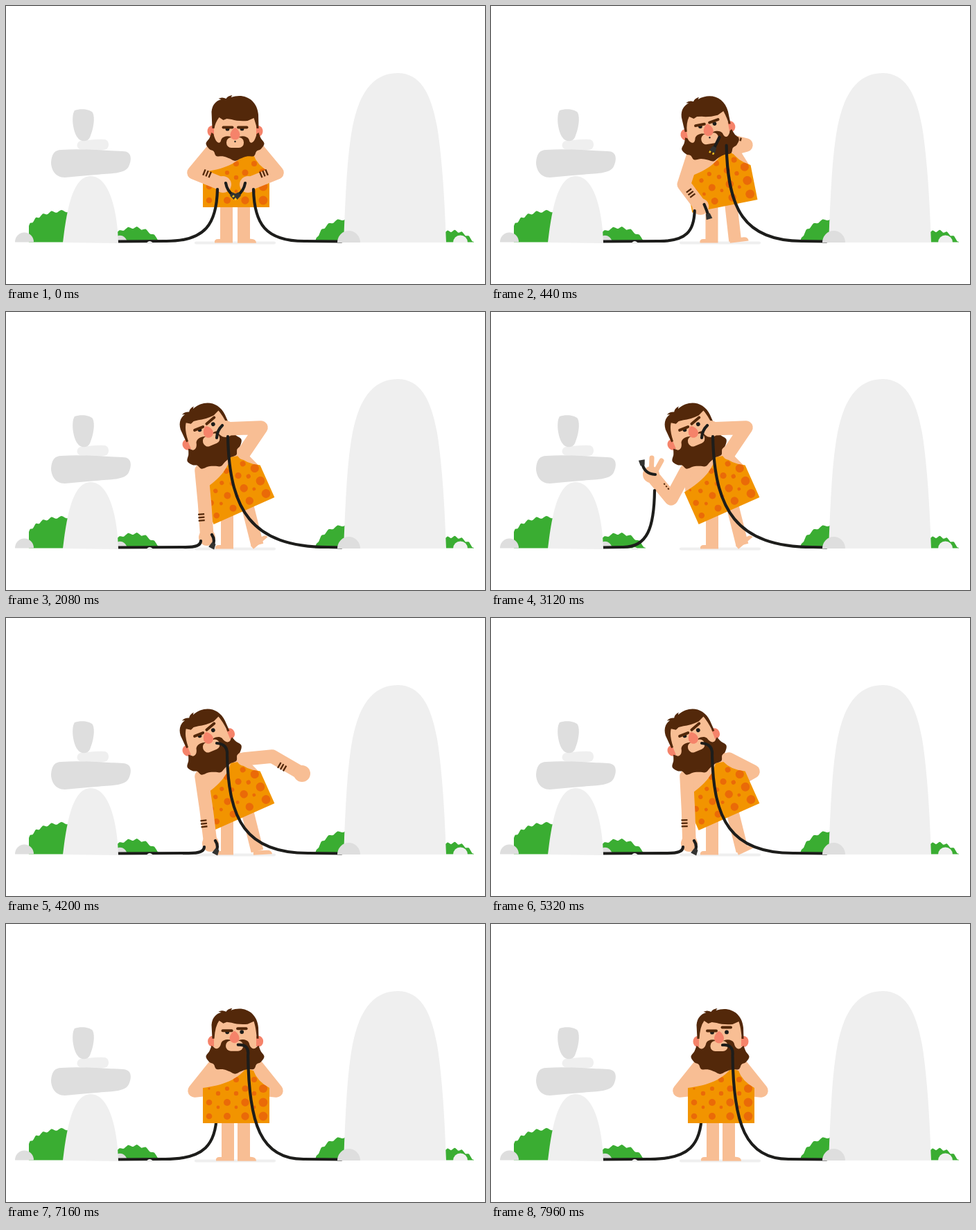
An HTML page for the animation above (8000 ms loop, 691 px wide and 402 px high).

```html
<!DOCTYPE html>
<html lang="en">
<head>
<meta charset="utf-8">
<title>Caveman and cable</title>
<style>
html, body { margin: 0; width: 100%; height: 100%; overflow: hidden; background: #fff; }
svg { display: block; width: 100%; height: 100%; }
.skin { fill: #f8be94; }
.limb { fill: none; stroke: #f8be94; stroke-linejoin: round; stroke-linecap: round; }
.hair { fill: #53280a; }
.band { fill: none; stroke: #53280a; stroke-width: 2.3; }
.brow { stroke: #53280a; stroke-width: 4; stroke-linecap: round; }
.wire { fill: none; stroke: #1d1d1b; stroke-width: 4.2; stroke-linecap: round; stroke-linejoin: round; }
.pink { fill: #f5836a; }
.bush { fill: #3aad32; }
.pale { fill: #efefef; }
.grey { fill: #dedede; }
</style>
</head>
<body>
<svg viewBox="0 0 691 402">
  <g id="bushes" class="bush"></g>
  <path class="grey" d="M155 342C156 329 171 328 175 341Z"/>
  <rect class="pale" x="272" y="340.5" width="117" height="4" rx="2"/>

  <g id="back"></g>
  <path id="legL" class="skin"/>
  <path id="legR" class="limb" style="stroke-width:18;stroke-linecap:butt"/>
  <path id="foot" class="skin" d="M0 0V-6H19Q27 -6 27 0Z"/>
  <g id="body">
    <clipPath id="cut"><path id="dress" d="M284 237C315 233 333 225 346 209L357 212Q362 227 380 237V288H284Z"/></clipPath>
    <path class="skin" d="M298 200L331 190L364 200L380 242H284Z"/>
    <use href="#dress" fill="#f29400"/>
    <g id="spots" fill="#ea6a08" clip-path="url(#cut)"></g>
  </g>
  <g id="mid"></g>
  <g id="head">
    <ellipse id="earL" class="pink" rx="7" ry="8"/>
    <ellipse id="earR" class="pink" rx="7" ry="8"/>
    <rect class="skin" x="-30.500" y="-36" width="61" height="64" rx="12"/>
    <path id="hair" class="hair"/>
    <path id="beard" class="hair"/>
    <g id="face">
      <rect class="skin" x="-12.500" y="-1" width="25" height="15" rx="7"/>
      <circle id="lips" cx="0" cy="5" r="1.2" fill="#1d1d1b"/>
      <g id="tongue">
        <path d="M-14 4Q-11 -2 -4 1L-7 4Z" fill="#53280a"/>
        <ellipse cx="-10" cy="3" rx="4" ry="2.4" fill="#e30613"/>
      </g>
      <g id="eyes" fill="#1d1d1b">
        <circle cx="-11" cy="-13.300" r="2.9"/>
        <circle cx="10" cy="-13.600" r="2.9"/>
      </g>
      <path class="brow" d="M-17 -15.500H-4"/>
      <path id="brow" class="brow"/>
      <path class="pink" d="M0 -15C3 -14 7 -9 7 -4.500A7 7 0 0 1 -7 -4.500C-7 -9 -3 -14 0 -15Z"/>
    </g>
  </g>
  <g id="front"></g>
  <g id="wires"></g>

  <path class="pale" d="M202 344Q207 336 213 344Z"/>
  <path class="pale" d="M82 342C87 300 95 246 122 246C150 246 161 300 162 343Z"/>
  <path class="pale" d="M108 195C120 194 132 192 142 193C150 194 149 205 145 207C135 210 115 208 107 207C101 206 101 196 108 195Z"/>
  <path class="grey" d="M99 151C108 148 120 149 125 154C129 162 126 178 121 190C118 197 107 197 103 190C96 180 94 158 99 151Z"/>
  <path class="grey" d="M80 208C110 206 140 209 168 210C183 210 181 224 177 232C172 243 150 242 130 244C112 245 100 247 85 248C70 248 65 235 65 226C66 214 70 208 80 208Z"/>
  <path class="grey" d="M13 341.500A13.500 14 0 0 1 40 341.500Z"/>
  <path class="pale" d="M487 342C489 300 491 210 502 165C513 118 535 97 565 97C597 97 613 125 622 175C630 225 633 290 635 342Z"/>
  <path class="grey" d="M478 342A16.500 17 0 0 1 511 342Z"/>
  <path class="pale" d="M645 342A10.500 10.500 0 0 1 666 342Z"/>
</svg>
<script>
const LOOP = 8000, GROUND = 340.5, AXIS = 331;
const $ = id => document.getElementById(id);
const set = (el, attrs) => { for (const k in attrs) el.setAttribute(k, attrs[k]); };
const add = (parent, tag, attrs) => {
  const el = document.createElementNS('http://www.w3.org/2000/svg', tag);
  set(el, attrs);
  return parent.appendChild(el);
};
const show = (el, on) => set(el, { visibility: on ? 'visible' : 'hidden' });
const mix = (a, b, u) => a + (b - a) * u;
const blend = (a, b, u) => Array.isArray(a) ? a.map((v, i) => mix(v, b[i], u)) : mix(a, b, u);
const ease = u => u < .5 ? 4 * u ** 3 : 1 - (2 - 2 * u) ** 3 / 2;
// Eased progress from 0 to 1 between two times
const ramp = (t, a, b) => ease(Math.min(1, Math.max(0, (t - a) / (b - a))));

// Moves through a start pose and [from, to, pose] steps
const play = (t, start, ...steps) =>
  steps.reduce((pose, [a, b, next]) => blend(pose, next, ramp(t, a, b)), start);

// Smooth curve through [x, y] points
function curve(p) {
  let d = `M${p[0]}`;
  for (let i = 0; i < p.length - 1; i++) {
    const a = p[i - 1] || p[i], b = p[i], c = p[i + 1], e = p[i + 2] || c;
    d += `C${b[0] + (c[0] - a[0]) / 6} ${b[1] + (c[1] - a[1]) / 6} ${c[0] - (e[0] - b[0]) / 6} ${c[1] - (e[1] - b[1]) / 6} ${c}`;
  }
  return d;
}

// Leafy edge: a rippled arc from (x0, y0) to (x1, y1), bent towards (cx, cy)
function bush(x0, y0, cx, cy, x1, y1, leaves) {
  const points = [], n = leaves * 4;
  for (let i = 0; i <= n; i++) {
    const u = i / n, v = 1 - u;
    points.push([
      v * v * x0 + 2 * u * v * cx + u * u * x1,
      v * v * y0 + 2 * u * v * cy + u * u * y1 - 1.6 * Math.sin(u * leaves * 2 * Math.PI)
    ]);
  }
  add($('bushes'), 'path', { d: `${curve(points)}V341.5H${x0}Z` });
}
bush(33, 318, 50, 294, 92, 297, 5);
bush(160, 328, 193, 308, 223, 341, 5);
bush(446, 341, 457, 311, 490, 308, 4);
bush(634, 327, 656, 320, 675, 341, 4);

// Big spots on a grid, small ones between them
for (let row = 0; row < 3; row++) {
  for (let col = 0; col < 4; col++) {
    const x = 293 + 26 * col, y = 278 - 20 * row;
    add($('spots'), 'circle', { cx: x, cy: y, r: row < 2 ? 4.3 + .7 * col : 1.6 + 1.5 * col });
    add($('spots'), 'circle', { cx: x + 13, cy: y - 13, r: 2.4 + row * .8 });
  }
}

function makeArm() {
  const g = add($('mid'), 'g', {});
  return {
    g,
    limb: add(g, 'path', { class: 'limb', 'stroke-width': 19.5 }),
    hand: add(g, 'circle', { class: 'skin', r: 12 }),
    bands: add(g, 'path', { class: 'band' })
  };
}

function makeWire() {
  const g = add($('wires'), 'g', {});
  const wire = { g, line: add(g, 'path', { class: 'wire' }), plug: add(g, 'g', {}) };
  wire.prongs = add(wire.plug, 'path', { d: 'M3 -2.700H7M3 2.700H7', stroke: '#f6c521', 'stroke-width': 2.4 });
  add(wire.plug, 'path', { d: 'M-4 -3L4 -4.500V4.500L-4 3Z', fill: '#333331' });
  return wire;
}

const armL = makeArm(), armR = makeArm();
const wireL = makeWire(), wireR = makeWire();
const fingers = add(armL.g, 'path', { class: 'limb', 'stroke-width': 7 });
wireL.prongs.remove();

// Arm pose: elbow, hand, band length
const flipArm = ([ex, ey, hx, hy, band]) => [2 * AXIS - ex, ey, 2 * AXIS - hx, hy, band];
const floorArm = x => [(283 + x) / 2, 277, x, 326, 9];
const hold = [271, 241, 313, 258, 9], behind = [272, 241, 300, 238, 0];
const wave = [260, 270, 231, 235, 2];
const high = [342, 156, 317, 119, 0], bite = [368, 167, 317, 169, 0];
const fling = [392, 164, 449, 126, 9], out = [384, 200, 427, 225, 9], hip = [378, 222, 350, 238, 0];

// Wire pose: grip, where it meets the ground, plug, end of the plug piece, its bend
const flipWire = ([gx, gy, reach, px, py, ex, ey, bend]) =>
  [2 * AXIS - gx, gy, 2 * AXIS - reach, 2 * AXIS - px, py, 2 * AXIS - ex, ey, -bend];
const floorWire = x => [x - 9, 331, x - 35, x + 8, 338, x + 7, 322, .3];
const holdWire = [305, 265, 230, 328, 274, 317, 256, -.2];
const behindWire = [304, 275, 228, 320, 262, 314, 260, 0];
const waveWire = [236, 258, 190, 218, 218, 237, 235, .4];
const highWire = [320, 130, 470, 306, 132, 312, 115, -.2];
const biteWire = [320, 180, 465, 304, 182, 312, 164, -.2];
const leanWire = [319, 198, 437, 304, 181, 319, 198, -.5];
const frontWire = [350, 190, 430, 336, 174, 350, 190, -.6];
const turnWire = [348.5, 190, 430, 334, 175, 348.5, 190, -.6];

function place(el, layer) {
  if (el.parentNode !== $(layer)) $(layer).appendChild(el);
}

function drawArm(arm, [sx, sy], [ex, ey, hx, hy, band], side) {
  set(arm.limb, { d: `M${sx} ${sy}L${ex} ${ey}L${hx} ${hy}` });
  set(arm.hand, { cx: hx, cy: hy });
  const n = Math.hypot(hx - ex, hy - ey) || 1, ux = (hx - ex) / n, uy = (hy - ey) / n;
  const spot = (s, o) => `${ex + ux * s + uy * o} ${ey + uy * s - ux * o}`;
  const d = [-4.5, 0, 4.5].map(s =>
    `M${spot(n * .4 + s, side - band / 2)}L${spot(n * .4 + s, side + band / 2)}`).join('');
  set(arm.bands, { d });
  show(arm.bands, band > .5);
}

function drawWire(wire, [gx, gy, reach, px, py, ex, ey, bend], anchor) {
  const span = reach - gx, drop = GROUND - gy;
  const taut = Math.min(1, Math.max(0, (drop - 160) / 50));
  const cx = (px + ex) / 2 - bend * (ey - py), cy = (py + ey) / 2 + bend * (ex - px);
  set(wire.line, { d: `M${gx} ${gy}C${gx + span * mix(.015, .06, taut)} ${gy + drop * mix(.65, .46, taut)}
    ${gx + span * mix(.22, .35, taut)} ${GROUND - 10 * taut} ${reach} ${GROUND - .5}L${anchor} ${GROUND}
    M${px} ${py}Q${cx} ${cy} ${ex} ${ey}` });
  const angle = Math.atan2(py - cy, px - cx) * 180 / Math.PI;
  set(wire.plug, { transform: `translate(${px} ${py}) rotate(${angle})` });
}

function drawHead(lean, dip, bob, turn) {
  const d = 14 * dip, ear = 4 * dip, tip = ear - 4;
  set($('head'), { transform: `translate(${mix(330.5, 292.3, lean)} ${mix(170, 179.5, lean) + 7 * dip + bob}) rotate(${-22 * lean})` });
  set($('earL'), { cx: -33 + turn, cy: ear });
  set($('earR'), { cx: 33 + turn, cy: ear });
  set($('hair'), { d: `M-33 ${tip}L-34 -24C-33 -35 -27 -40 -20 -42L-24 -43Q-19 -46 -13 -43Q-11 -47 -4 -48L-6 -45
    C14 -52 32 -41 33.500 -20L34 ${tip}H31C31 ${-10 + d / 2} 30 ${-20 + d} 27 ${-29 + d}L18 ${-25 + d}Q4 ${-24 + d} -5 ${-27 + d}
    L-12 ${-28 + d}L-17 ${-26 + d}L-23 ${-30 + d}Q-29 ${-22 + d} -30 ${tip}Z` });
  const half = [[34, 6], [37, 14], [42, 22], [37, 30], [31, 33], [27, 40], [17, 40.5], [8, 43.5]];
  const edge = [...half.map(([x, y]) => [-x, y]), [0, 47], ...half.reverse()];
  set($('beard'), { d: `${curve(edge)}L31 8C29 ${12 + d / 2} 22 ${12 + d} 20 ${2 + d}C17 ${-4 + d} 6 ${-4 + d} 2 ${1 + d}
    H-2C-6 ${-4 + d} -17 ${-4 + d} -20 ${2 + d}C-22 ${12 + d} -29 ${12 + d / 2} -31 8Z` });
  set($('face'), { transform: `translate(${1.5 * (lean - turn)} ${d})` });
  set($('eyes'), { transform: `translate(${lean + turn} 0)` });
  const lift = -15.5 - 5 * turn;
  set($('brow'), { d: `M${4.5 - 2 * lean} ${lift - 2 * lean}L${17 - lean} ${lift - 6.5 * lean}` });
}

function draw(t) {
  const crouch = [250, 640], stand = [5920, 6260], behindNow = t > 6050;
  const dip = 1 - ramp(t, ...crouch);
  const lean = 1 - dip - ramp(t, ...stand);
  const turn = ramp(t, 7000, 7300);
  const bob = -1.5 * Math.sin(Math.PI * ramp(t, 6500, 7400));
  const tap = play(t, 0, [300, 700, -40], [3400, 3700, -3], [4250, 4700, -25], [5850, 6200, 0]);
  const spread = ramp(t, 2650, 2900) - ramp(t, 3360, 3520);

  const left = (start, floor, up, end) => play(t, start, [...crouch, floor(290)], [2560, 2880, up],
    [3400, 3760, floor(295)], [4250, 4700, floor(286)], [...stand, end]);
  const poseL = left(hold, floorArm, wave, behind);
  const poseR = play(t, flipArm(hold), [...crouch, high], [1400, 1640, bite], [3400, 3640, fling],
    [3740, 4180, out], [4260, 4560, hip], [...stand, flipArm(behind)]);

  place(armL.g, behindNow ? 'back' : 'mid');
  place(wireL.g, behindNow ? 'back' : 'wires');
  place(armR.g, t > 4450 ? 'back' : t > 1400 && t < 3520 ? 'front' : 'mid');

  const x = 311 - 2 * dip - lean;
  set($('legL'), { d: `M${x} 280H${x + 18}V342.5H${x - 8}Q${x - 9} 337 ${x - 3} 337H${x}Z` });
  set($('legR'), { d: `M${mix(343, 349, lean)} 283L${mix(343, 362.5, lean)} ${mix(342, 337, lean)}` });
  set($('foot'), { transform: `translate(${mix(334, 357, lean)} 342.7) rotate(${tap})` });
  set($('body'), { transform: `translate(${11.5 * lean} ${3 * dip - .5 * lean}) rotate(${-24 * lean} 332 288)` });
  drawHead(lean, dip, bob, turn);
  show($('lips'), dip > .5);
  show($('tongue'), t > 700 && t < 1600);

  drawArm(armL, blend([300, 206], [282, 229], lean), poseL, mix(6, -6, lean));
  drawArm(armR, blend([362, 206], [343, 204], lean), poseR, -6);
  set(fingers, { d: `M${poseL[2]} ${poseL[3]}l${spread} ${-24 * spread}m${3 * spread} ${24 * spread}l${11 * spread} ${-20 * spread}` });

  drawWire(wireL, left(holdWire, floorWire, waveWire, behindWire), 158);
  drawWire(wireR, play(t, flipWire(holdWire), [...crouch, highWire], [1400, 1640, biteWire],
    [3400, 3600, leanWire], [...stand, frontWire], [7000, 7300, turnWire]), 484);
  show(wireR.plug, t < 1620);
}

function tick() {
  draw(performance.now() % LOOP);
  requestAnimationFrame(tick);
}
tick();
</script>
</body>
</html>
```
